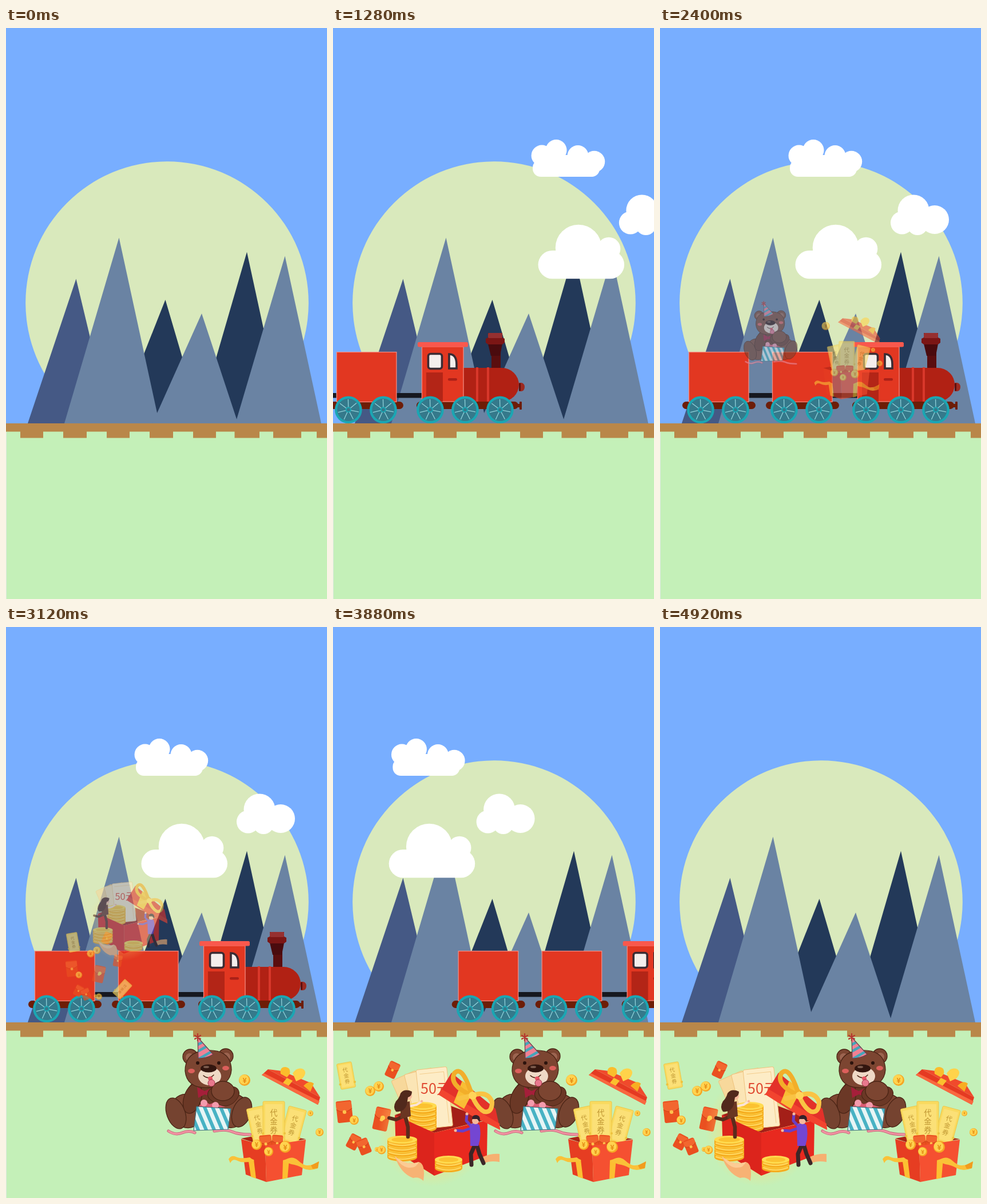
These frames come from a looping animation (561 px wide and 998 px high, 5000 ms). An HTML page:

```html
<!DOCTYPE html>
<html lang="zh">
<head>
<meta charset="utf-8">
<title>Gift train</title>
<style>
html, body { margin: 0; width: 100%; height: 100%; overflow: hidden; background: #78aeff; }
svg { display: block; width: 100%; height: 100%; }
text { font-family: "Noto Sans CJK SC", "Noto Sans CJK", "Noto Sans", sans-serif; text-anchor: middle; }
</style>
</head>
<body>
<svg id="stage" viewBox="0 0 561 998" preserveAspectRatio="none"></svg>
<script>
const LOOP = 5000, STEP = 40, ARRIVE = 2000, LEAVE = 3440;

// Drawing helpers
const poly = (pts, fill, more = '') => `<polygon points="${pts}" fill="${fill}" ${more}/>`;
const rect = (x, y, w, h, fill, r = 0, more = '') =>
  `<rect x="${x}" y="${y}" width="${w}" height="${h}" rx="${r}" fill="${fill}" ${more}/>`;
const oval = (x, y, rx, ry, fill, more = '') =>
  `<ellipse cx="${x}" cy="${y}" rx="${rx}" ry="${ry}" fill="${fill}" ${more}/>`;
const dot = (x, y, r, fill, more = '') => oval(x, y, r, r, fill, more);
const path = (d, fill, more = '') => `<path d="${d}" fill="${fill}" ${more}/>`;
const line = (d, color, w) =>
  path(d, 'none', `stroke="${color}" stroke-width="${w}" stroke-linecap="round" stroke-linejoin="round"`);
const at = (x, y, turn, body) => `<g transform="translate(${x} ${y}) rotate(${turn})">${body}</g>`;
const group = (id, body) => `<g id="${id}">${body}</g>`;

const coin = (x, y, r) =>
  dot(x, y, r, '#f6a623') + dot(x - r * .1, y - r * .1, r * .84, '#ffd34f') +
  `<text x="${x}" y="${y + r * .45}" font-size="${r * 1.2}" font-weight="700" fill="#e58a12">¥</text>`;

const ticket = (x, y, w, h, turn) => {
  const size = w * .35;
  const word = [...'代金券'].map((c, i) =>
    `<text y="${(i - .65) * size * 1.12}" font-size="${size}" fill="#bf9632">${c}</text>`).join('');
  return at(x, y, turn, rect(-w / 2, -h / 2, w, h, '#f9da60', 2, 'stroke="#edc23e" stroke-width=".8"') +
    rect(-w * .4, -h * .43, w * .8, h * .86, '#fbe077', 1) +
    dot(-w / 2, h * .3, 2, '#edc23e') + dot(w / 2, h * .3, 2, '#edc23e') + word);
};

const envelope = (x, y, w, h, turn) => at(x, y, turn,
  rect(-w / 2, -h / 2, w, h, '#ea5020', 3) +
  path(`M${-w / 2} ${-h / 2 + 2}H${w / 2}V${-h * .12}Q0 ${h * .14} ${-w / 2} ${-h * .12}Z`, '#f2662f') +
  line(`M${-w / 2} ${-h * .12}Q0 ${h * .14} ${w / 2} ${-h * .12}`, '#d04018', 1) +
  dot(0, h * .02, w * .12, '#ffc04d'));

const stack = (x, top, rx, rows) => {
  let out = '';
  for (let i = rows; i-- > 0;) {
    const y = top + i * 8;
    out += path(`M${x - rx} ${y}v7a${rx} 7 0 0 0 ${rx * 2} 0v-7z`, '#f5ab1d') +
      line(`M${x - rx + 3} ${y + 6}Q${x} ${y + 14} ${x + rx - 3} ${y + 6}`, '#ffd65c', 2.5) +
      oval(x, y, rx, 7, '#ffdb50');
  }
  return out + oval(x, top, rx * .72, 4.3, '#fbc231');
};

// Landscape
function scenery() {
  const peaks = [
    ['122.5,438.5 38,691 183,691', '#455985'],
    ['278.5,475 193,691 342,691', '#233959'],
    ['421,391.5 334,691 486,691', '#233959'],
    ['197.5,366.5 102,691 268,691', '#6a83a3'],
    ['342,499 256,691 405.5,691', '#6a83a3'],
    ['487.5,398.5 401,691 551,691', '#6a83a3']
  ];
  const ties = [[25, 40], [100, 41], [176, 40], [251, 41], [327, 40], [399.5, 43.5], [467, 49], [543, 18]];
  return rect(0, 0, 561, 998, '#78aeff') + dot(281.5, 480.5, 247.3, '#d9e9bc') +
    peaks.map(p => poly(...p)).join('') +
    rect(0, 691, 561, 307, '#c4f0b8') + rect(0, 706, 1, 292, '#dfe9e1') +
    rect(0, 691, 561, 14.5, '#b98749') +
    ties.map(([x, w]) => rect(x, 705, w, 11.5, '#b98749')).join('');
}

const puffs = list => list.map(([x, y, r]) => dot(x, y, r, '#fff')).join('');
const clouds = [
  puffs([[243, 223, 18.5], [268, 213.5, 18.5], [306, 223.5, 18.5], [334.5, 233.5, 18.7], [329, 245, 15]]) +
    rect(227, 230, 117, 30, '#fff', 14) + rect(245, 222, 75, 25, '#fff'),
  puffs([[443, 319, 27.5], [480, 335, 25], [423, 340.5, 20], [450, 344, 18]]),
  puffs([[307, 384, 40.3], [360, 386, 20.3]]) + rect(236.5, 389, 150.5, 49.3, '#fff', 24.6)
];

// Train
function wheel(x) {
  let spokes = '';
  for (let i = 0; i < 7; i++) {
    const a = i * Math.PI * 2 / 7 + .2;
    spokes += `M0 0L${18 * Math.cos(a)} ${18 * Math.sin(a)}`;
  }
  return at(x, 667.3, 0, dot(0, 0, 21.7, '#35798b', 'stroke="#1ba6b3" stroke-width="4.2"') +
    line(spokes, '#8fd2da', 1.3) + dot(0, 0, 5, '#1ba6b3') + dot(0, 0, 3, '#35798b'));
}
const EDGE = 'stroke="#f4897f" stroke-width="1.3"';
const wagon = x => rect(x - 11, 653, 128, 13, '#6d1d07', 6.5) +
  rect(x + .5, 566.5, 104.5, 87, '#e23721', 0, EDGE) + wheel(x + 21) + wheel(x + 82);

function train() {
  const frame = 'stroke="#3a2c34" stroke-width="3.6"';
  return rect(155, 638, 41, 8.5, '#16181f') + rect(301, 638, 45, 8.5, '#16181f') +
    wagon(50) + wagon(196) +
    rect(336, 653, 178, 13, '#6d1d07', 6.5) + rect(505, 657, 14, 6, '#6d1d07') + rect(516, 653, 4, 14, '#6d1d07', 1) +
    path('M515 620h4q6 1 6 7.5t-6 7.5h-4z', '#9c2a20') + rect(515, 621, 3, 13, '#5c0f0d') +
    rect(467, 550, 16, 46, '#5a0e0f') + poly('461,552 486,552 482,573 466,573', '#4a0b0e') +
    path('M461 533h25v8l4 2v7l-4 3h-25l-4-3v-7l4-2z', '#7b1615') + rect(461, 533, 25, 9, '#963030', 2) +
    path('M418 594h67a30 29.5 0 0 1 0 59h-67z', '#b12114') +
    rect(440, 593, 4, 60, '#d9382b') + rect(459, 593, 4, 60, '#d9382b') +
    rect(345.5, 557, 72.5, 96, '#e23721', 0, EDGE) + rect(338, 549, 88, 8.5, '#f9584d', 2.5) +
    rect(353, 602, 29, 51, '#b32517') +
    rect(356.5, 569.5, 24, 26, '#f4eeec', 4, frame) +
    path('M393 570q13 0 13 18v7h-13z', '#f4eeec', frame) +
    rect(391, 612, 16, 4.5, '#ab2118', 2.2) +
    wheel(360) + wheel(421) + wheel(482);
}

// Gifts
function bear() {
  const ink = 'stroke="#4a2415" stroke-width="1.3"', fur = '#7c4531', dark = '#6b3826', pale = '#efd9c6';
  const turn = (a, x, y) => `${ink} transform="rotate(${a} ${x} ${y})"`;
  return line('M284 881q12 8 24 3t22 0M364 881q20-4 31 1t32 5', '#c45a72', 5) +
    line('M284 881q12 8 24 3t22 0M364 881q20-4 31 1t32 5', '#f092a2', 3.4) +
    oval(354, 828, 41, 42, dark, ink) +
    oval(316, 846, 27, 30, fur, turn(-25, 316, 846)) + oval(297, 850, 16, 28, '#754330', turn(-20, 297, 850)) +
    oval(396, 846, 26, 30, fur, turn(25, 396, 846)) + oval(412, 848, 16, 27, '#754330', turn(20, 412, 848)) +
    oval(326, 824, 15, 27, dark, turn(18, 326, 824)) +
    dot(322, 751, 13, fur, ink) + dot(321, 752, 7, '#9c6450') +
    dot(384, 750, 13, fur, ink) + dot(385, 751, 7, '#9c6450') +
    path('M313 776q0-35 40-36t41 34q-2 29-40 31t-41-29z', fur, ink) +
    oval(356, 785, 20, 16, pale) + oval(354, 771.5, 14, 7, '#33160f') + oval(350, 769, 5, 2, '#7b5a4c') +
    dot(335, 762, 3, '#2b130d') + dot(372, 762, 3, '#2b130d') +
    oval(324, 776, 6, 4, '#dc5f5b') + oval(384, 771, 6, 4, '#dc5f5b') +
    line('M345 784q9 8 18-1', '#4a2415', 1.6) + oval(357, 789, 4, 3.5, '#e85664') +
    poly('334,804 347,811 347,817 336,823', '#a51f3a') + poly('347,811 359,806 358,820 347,817', '#a51f3a') +
    line('M396 815Q386 835 364 817', '#4a2415', 24) + line('M396 815Q386 835 364 817', dark, 22) +
    oval(379, 811, 20, 17, fur, ink) + dot(359, 797, 6, '#e8788d', 'stroke="#9d3448"') +
    `<clipPath id="cone"><path d="M335 717L336 754Q350 754 362 747z"/></clipPath>
    <clipPath id="pack"><path d="M333 838L393 842 388 878 328 880z"/></clipPath>` +
    `<g clip-path="url(#cone)">${rect(325, 710, 45, 50, '#f08194')}${line('M326 735l22-12M326 747l30-17M332 758l34-20', '#46a5b9', 4.5)}</g>` +
    line('M335 717L336 754Q350 754 362 747z', '#703d4a', 1.2) +
    line('M330 714l10 6M335 711v12M330 720l10-6', '#b7352e', 2.2) +
    poly('336,839 345,828 356,834 365,831 374,836 384,839', '#da5b73') +
    dot(346, 832, 6, '#f49bad') + dot(366, 836, 6, '#f49bad') +
    `<g clip-path="url(#pack)">${rect(322, 832, 80, 55, '#e7f5f5')}${
      line([0, 1, 2, 3, 4, 5, 6].map(i => `M${316 + i * 14} 832l22 52`).join(''), '#48b2c4', 6)}</g>` +
    line('M333 838L393 842 388 878 328 880z', '#3e6e7b', 1.2);
}

function voucherBox() {
  return coin(417, 792, 10) + coin(532, 850, 5) + coin(548, 883, 7) +
    poly('447,783 458,773 549,822 545,835', '#e53a22') +
    poly('458,773 482,776 533,797 549,822', '#f04a2c') +
    path('M480 781q-2-12 8-12 10 1 8 12l-5 6z', '#fbbd2c') +
    path('M501 780q8-12 19-7 7 6-2 16l-11 5z', '#ffd34a') +
    path('M520 802q10-11 18-4l-6 14z', '#f8ad22') +
    poly('491,788 501,793 493,803 483,798', '#fac02e') +
    poly('447,783 451,780 548,829 545,835', '#f9683f') +
    poly('411,894 462,884 524,895 455,908', '#a92416') +
    ticket(441, 869, 30, 60, -12) + ticket(502, 871, 32, 62, 15) + ticket(468, 864, 38, 70, 0) +
    envelope(454, 903, 21, 30, -5) + envelope(474, 902, 19, 28, 4) +
    coin(438, 906, 9.5) + coin(489, 909, 11) +
    poly('411,895 453,907 455,970 419,957', '#e63d22') + poly('453,907 524,896 517,958 455,970', '#f55031') +
    coin(438, 905, 9) + coin(459, 917, 8) + coin(488, 909, 10) +
    poly('423,928 433,931 437,964 428,961', '#fcbf31') + poly('484,932 495,929 492,963 483,965', '#fcbf31') +
    path('M389 930q5-8 13-4t24 1l8 6q-20 5-29 0t-13 4z', '#fac138') +
    path('M484 934q15-12 26-2t17 9q12 0 20-7l-2 12q-15 6-26 0t-20-7z', '#fac138') +
    poly('533,941 547,934 545,946 536,947', '#f19c1d');
}

function scatter() {
  return ticket(23, 784, 26, 45, -10) + envelope(104, 774, 19, 28, 25) +
    coin(65, 811, 9) + coin(80, 803, 9) +
    envelope(20, 847, 27, 38, -6) + coin(37, 862, 8) + envelope(85, 860, 26, 40, 12) + dot(87, 858, 4, '#ffd04d') +
    envelope(36, 900, 19, 26, 28) + envelope(54, 908, 20, 27, -22) +
    coin(77, 913, 4) + coin(85, 914, 7.5) +
    envelope(130, 828, 20, 28, 10) + ticket(141, 896, 24, 44, 42);
}

function moneyBox() {
  const skin = '#f6b99c', trim = 'stroke="#eec27d"';
  return `<radialGradient id="glow"><stop offset=".5" stop-color="#ffd870" stop-opacity=".7"/>
    <stop offset="1" stop-color="#ffdf7a" stop-opacity="0"/></radialGradient>` +
    oval(174, 880, 95, 98, 'url(#glow)') +
    poly('108,853 182,828 270,861 177,884', '#a41f18') +
    at(142, 825, -24, rect(-24, -45, 46, 95, '#f7d89b', 3, trim)) +
    at(160, 822, -14, rect(-25, -47, 50, 100, '#fbe5b5', 3, trim)) +
    at(178, 821, -6, rect(-28, -50, 54, 104, '#fdecc6', 3, trim) + line('M-22 -42H20V48', '#f3cd8d', 1)) +
    `<text x="153" y="816" font-size="25" fill="#e04a32" style="text-anchor:start" textLength="0">50元</text>`.replace(' textLength="0"', '') +
    stack(157, 837, 24, 5) +
    poly('108,853 177,884 177,959 110,917', '#dc241c') + poly('177,884 270,862 269,924 177,959', '#e8291f') +
    poly('207,779 284,842 292,878 184,817', '#e3312a') + poly('184,817 190,808 291,868 292,879 240,853', '#f2442f') +
    poly('226,793 246,810 229,842 211,831', '#f9bd35') +
    line('M243 819Q202 801 212 780Q226 764 243 819Z', '#f2ae2a', 8) +
    line('M243 819Q270 809 278 830Q278 850 264 847Q252 841 243 819', '#f9c344', 8) +
    line('M243 819L220 824', '#f9c344', 8) + dot(244, 819, 7, '#ffd459') +
    stack(121, 896, 26, 4) + stack(202, 931, 24, 2) +
    path('M108 925q20 18 42 10 12 3 8 33-8-8-18-5-22-8-32-38z', '#f7b274') + path('M108 925q20 18 42 10-4 11-18 10-14-2-24-20z', '#fccb94') +
    path('M262 926q14-6 29-5v14q-16-3-26 2z', '#f6b071') +
    // woman on the coins
    line('M132 838L146 835 154 830', '#fbe3d6', 4) + dot(155, 829, 2.3, skin) +
    line('M126 855L131 874 131 891', '#5a2c1c', 6.5) + line('M124 855L110 861 98 858', '#5a2c1c', 6) +
    path('M118 832l16-3 2 26-18 5z', '#6b3622') + dot(132, 820, 6, skin) +
    path('M138 812q-13-6-20 3-2 8-8 14-6 10 0 18 14 2 19-12l2-13q7-2 7-10z', '#51291c') +
    // man by the box
    line('M248 905L241 921 242 940', '#3c2627', 7) + line('M251 904L256 921 263 937', '#3c2627', 7) +
    line('M241 872L233 863 234 852M241 876L227 881 216 880', '#6a3fc4', 5) +
    dot(234, 851, 2.5, skin) + dot(214, 880, 2.5, skin) +
    path('M239 871q9-8 17 0 4 18-2 36h-14z', '#7446d2') + dot(249, 863, 6, skin) +
    path('M243 860q0-8 8-7 8 2 5 12l-4-5z', '#35212a');
}

const stage = document.getElementById('stage');
stage.innerHTML = scenery() + clouds.map((c, i) => group('cloud' + i, c)).join('') + group('train', train()) +
  group('bear', bear()) + group('vouchers', voucherBox()) + group('scatter', scatter()) + group('money', moneyBox());
const el = id => document.getElementById(id);

// Entry distance in px, exit speed in px per ms
const movers = [
  ['cloud0', 339, -.2786],
  ['cloud1', 269, -.3464],
  ['cloud2', 339, -.3155],
  ['train', -528, .3833]
].map(([id, enter, speed]) => ({ node: el(id), enter, speed }));

// Each gift grows above the train, then lands at its own place
const gifts = [
  { id: 'bear', t0: 2000, t1: 2700, c: [354, 800], from: [243.6, 567.6], to: [155, 507], s: .114 },
  { id: 'vouchers', t0: 2000, t1: 2680, c: [473, 870], from: [330, 577], to: [330, 577], s: .32 },
  { id: 'scatter', t0: 2680, t1: 3360, c: [85, 840], from: [162.5, 592], to: [162.5, 592], s: .235 },
  { id: 'money', t0: 2720, t1: 3400, c: [193, 866], from: [169.4, 494.8], to: [250, 520], s: .175 }
].map(g => ({ ...g, node: el(g.id) }));

const mix = (a, b, p) => a + (b - a) * p;

function draw(t) {
  for (const m of movers) {
    const x = m.enter * Math.max(0, 1 - t / ARRIVE) + m.speed * Math.max(0, t - LEAVE);
    m.node.setAttribute('transform', `translate(${x} 0)`);
  }
  for (const g of gifts) {
    const p = Math.max(0, (t - g.t0) / (g.t1 - g.t0)), landed = p >= 1;
    const [x, y] = landed ? g.c : g.from.map((v, i) => mix(v, g.to[i], p));
    g.node.setAttribute('opacity', Math.min(1, p));
    g.node.setAttribute('transform',
      `translate(${x} ${y}) scale(${landed ? 1 : mix(g.s, 1, p)}) translate(${-g.c[0]} ${-g.c[1]})`);
  }
}

const start = performance.now();
function tick(now) {
  const t = Math.max(0, now - start) % LOOP;
  draw(Math.min(LOOP - 2 * STEP, Math.floor(t / STEP) * STEP));
  requestAnimationFrame(tick);
}
draw(0);
requestAnimationFrame(tick);
</script>
</body>
</html>
```
